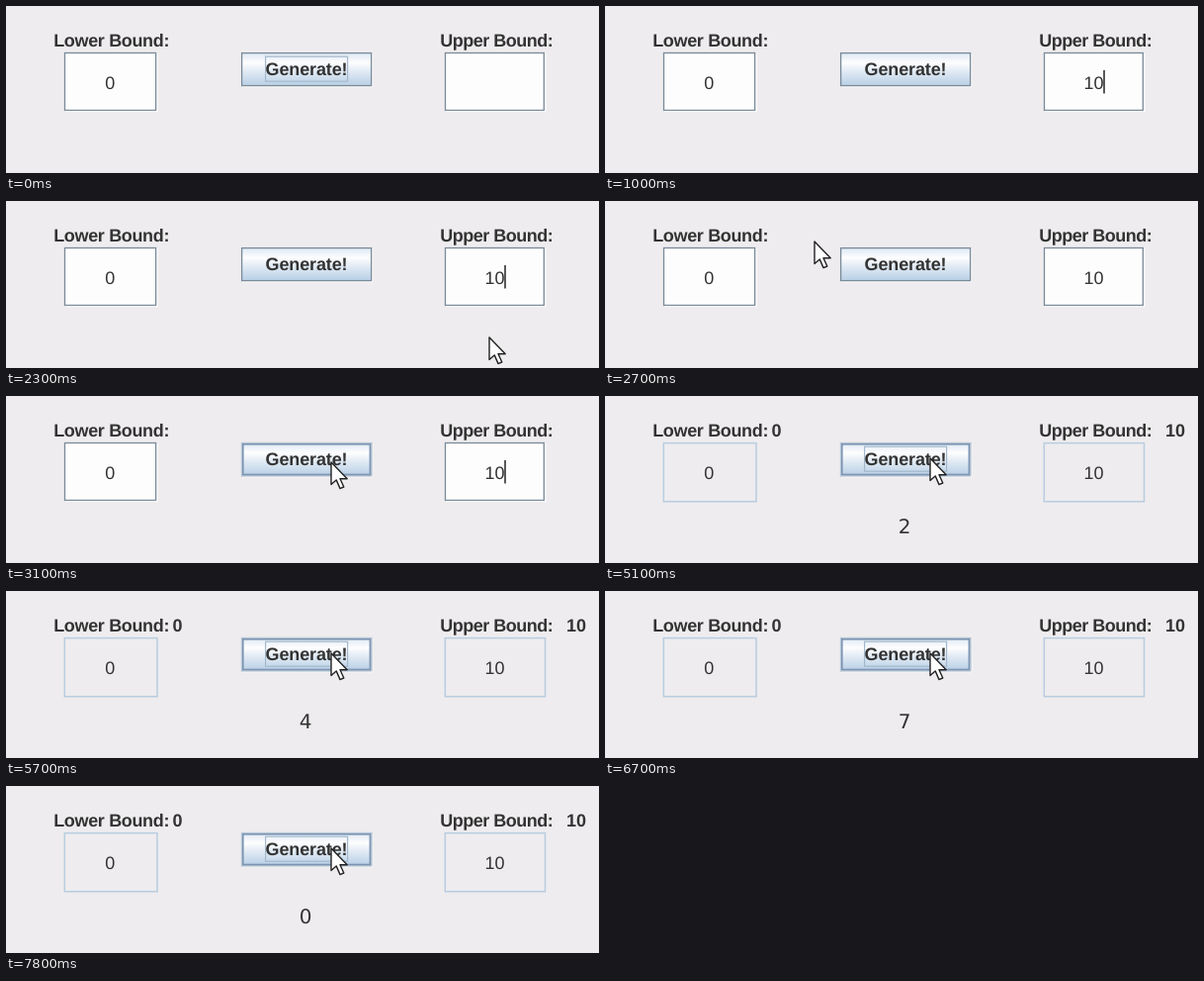
Recreate the animation shown at these times as an HTML page. Size 600x169 px, loop 8000 ms.

```html
<!DOCTYPE html>
<html lang="en">
<head>
<meta charset="utf-8">
<title>Random number generator</title>
<style>
  html, body { margin: 0; width: 100%; height: 100%; overflow: hidden; background: #eeecee; }
  svg { display: block; width: 600px; height: 169px; }
  text { font: 18px "Liberation Sans", Arial, sans-serif; fill: #333; white-space: pre; text-rendering: geometricPrecision; }
  .label { font-weight: bold; }
  .mid { text-anchor: middle; }
  #result { font: 20px "DejaVu Sans", sans-serif; }
</style>
</head>
<body>
<svg viewBox="0 0 600 169">
  <defs>
    <linearGradient id="steel" x2="0" y2="1">
      <stop offset="0" stop-color="#dde8f3"/>
      <stop offset=".3" stop-color="#fdfdfe"/>
      <stop offset=".6" stop-color="#dde8f3"/>
      <stop offset="1" stop-color="#b8cfe5"/>
    </linearGradient>
  </defs>
  <rect width="600" height="169" fill="#eeecee"/>

  <text class="label" x="48.2" y="41" letter-spacing="-.34">Lower Bound:</text>
  <text class="label" x="439.2" y="41" letter-spacing="-.5">Upper Bound:</text>
  <g id="bounds">
    <text class="label" x="168.4" y="41">0</text>
    <text class="label" x="567" y="41">10</text>
  </g>

  <g id="open" fill="#fefdfe" stroke="#7a8a99" stroke-width="1.3">
    <path d="M60 106.6H153V48M445 106.6H546V48" fill="none" stroke="#fff"/>
    <rect x="59.5" y="47.5" width="92.1" height="58"/>
    <rect x="444.5" y="47.5" width="99.8" height="58"/>
  </g>
  <g id="locked" fill="none" stroke="#b8cde0" stroke-width="1.5">
    <rect x="59.3" y="47.6" width="93.7" height="59.2"/>
    <rect x="444.3" y="47.6" width="101.2" height="59.2"/>
  </g>
  <text class="mid" x="105.3" y="84">0</text>
  <text class="mid" id="upper" x="494.6" y="84"></text>
  <path id="caret" d="M0 65V88.5" stroke="#222" stroke-width="1.5"/>

  <path d="M239 81.8H370.8V48" fill="none" stroke="#fff"/>
  <rect id="face" x="238.6" y="47.6" width="131" height="33" stroke="#7a8a99" stroke-width="1.3"/>
  <g id="hover" fill="none">
    <rect x="238.6" y="47.6" width="131" height="33" stroke="#b4c5d8" stroke-width="1.3"/>
    <rect x="239.8" y="48.8" width="128.6" height="30.7" stroke="#7d95b1" stroke-width="1.6"/>
  </g>
  <rect id="focus" x="262.6" y="51.2" width="83" height="25" fill="none" stroke="#a3b8cc" stroke-width="1.2"/>
  <text class="label" x="262.5" y="70" letter-spacing="-.12">Generate!</text>

  <text class="mid" id="result" x="303.2" y="139"></text>
  <path id="cursor" d="M0 0V22.6L5.2 17.9L9 26.6L12.8 25L9 16.7H16.2Z"
        fill="#fff" stroke="#222" stroke-width="1.4" stroke-linejoin="round"/>
</svg>
<script>
const LOOP = 8000, TICK = 100, LOCK = 3600;
const $ = id => document.getElementById(id);
const show = (id, on) => $(id).setAttribute("visibility", on ? "visible" : "hidden");

// [time, value] steps
const typed = [[0, ""], [600, "1"], [900, "10"]];
const results = [[0, ""], [3700, "5"], [4600, "2"], [5300, "4"], [6100, "9"], [6600, "7"], [7500, "0"]];
const presses = [3600, 4500, 5200, 6000, 6500];
// [time, x, y] of the pointer tip
const path = [[2300, 489, 138], [2500, 330, 72], [2700, 212, 41], [2900, 334, 76],
              [3000, 334, 76], [3100, 329, 67], [3200, 329, 63]];

const stepAt = (steps, t) => steps.filter(s => s[0] <= t).pop()[1];

function pointerAt(t) {
  const i = path.findIndex(p => p[0] > t);
  if (i < 0) return path[path.length - 1].slice(1);
  if (i === 0) return null;
  const [t0, x0, y0] = path[i - 1], [t1, x1, y1] = path[i];
  const k = (t - t0) / (t1 - t0);
  return [x0 + (x1 - x0) * k, y0 + (y1 - y0) * k];
}

function caretOn(t) {
  if (t < 200 || t >= LOCK) return false;
  const since = t < 600 ? t - 200 : t < 900 ? t - 600 : t - 900;
  return since % 1000 < 500;
}

function draw(time) {
  const t = Math.floor(time / TICK) * TICK;
  const locked = t >= LOCK;
  const text = stepAt(typed, t);
  const tip = pointerAt(t);
  const over = !!tip && tip[0] > 238 && tip[0] < 370 && tip[1] > 47 && tip[1] < 81;
  const down = presses.includes(t);

  $("upper").textContent = text;
  $("result").textContent = stepAt(results, t);
  $("caret").setAttribute("transform", `translate(${495 + text.length * 5})`);
  $("face").setAttribute("fill", down ? "#b8cfe5" : "url(#steel)");
  show("caret", caretOn(t));
  show("open", !locked);
  show("locked", locked);
  show("bounds", locked);
  show("focus", t < 200 || locked);
  show("hover", over && !down);
  show("cursor", tip);
  if (tip) $("cursor").setAttribute("transform", `translate(${tip})`);
}

const start = performance.now();
function frame() {
  draw((performance.now() - start) % LOOP);
  requestAnimationFrame(frame);
}
frame();
</script>
</body>
</html>
```
